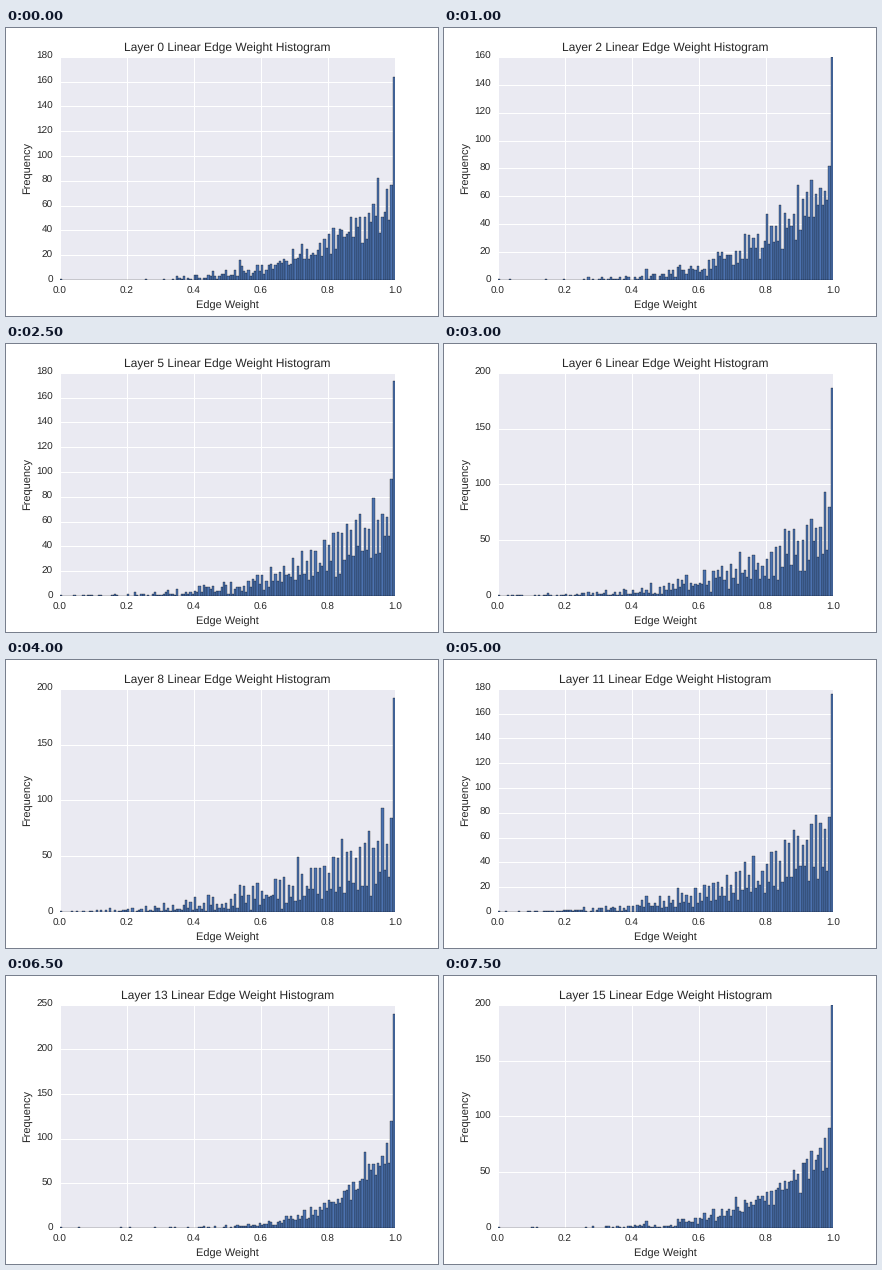
Write a matplotlib script that moves like this. It is 432x288 px and loops after 8 s.

```python
import numpy as np
import matplotlib.pyplot as plt
from matplotlib.animation import FuncAnimation

plt.rcParams.update({
    "font.family": "Liberation Sans",
    "text.hinting": "none",
    "text.color": "0.15",
    "axes.labelcolor": "0.15",
    "xtick.color": "0.15",
    "ytick.color": "0.15",
    "ytick.alignment": "center",
    "axes.facecolor": "#EAEAF2",
    "axes.axisbelow": True,
})

BINS = 150
LAYERS = [0, 1, 2, 3, 4, 5, 6, 7, 8, 9, 11, 10, 12, 13, 14, 15]
# Height of the rightmost bar, which also sets the y range
PEAKS = [164, 170, 160, 190, 168, 173, 186, 188,
         192, 174, 176, 190, 195, 240, 225, 200]


def counts(i):
    """Noisy power-law histogram; flatter curves zigzag more."""
    rng = np.random.default_rng(40 + i)
    k = np.arange(BINS)
    x = (k + 0.5) / BINS
    p = np.interp(i, [0, 2, 8, 10, 13, 15], [4, 4, 3, 3.2, 6, 4.6])
    mean = 14 * (p + 1) * x ** p + 8 * max(0, 4 - p) * x * (1 - x) + 0.05
    swing = max(0.08, 0.38 - 0.2 * (p - 3))
    h = rng.poisson(mean * (1 + swing * (-1.0) ** k))
    h[0], h[-1] = 1, PEAKS[i]
    return h


def y_ticks(peak):
    step = 20 if peak <= 180 else 50
    top = -(-peak // step) * step
    return np.arange(0, top + 1, step)


fig = plt.figure(figsize=(6, 4), dpi=72, facecolor="white")
ax = fig.add_axes([0.125, 0.125, 0.775, 0.775])
for spine in ax.spines.values():
    spine.set_visible(False)
ax.grid(True, color="white", linewidth=1, linestyle="-")
ax.tick_params(length=0, pad=7, labelsize=10)
ax.set_xlim(0, 1)
ax.set_xticks(np.linspace(0, 1, 6))
ax.set_xlabel("Edge Weight", fontsize=11, labelpad=4)
ax.set_ylabel("Frequency", fontsize=11, labelpad=4)
title = ax.set_title("", fontsize=12, pad=5)
bars = ax.bar(np.arange(BINS) / BINS, np.zeros(BINS), 1 / BINS, align="edge",
              color="#4C72B0", edgecolor="black", linewidth=0.3)


def draw(i):
    ticks = y_ticks(PEAKS[i])
    ax.set_ylim(0, ticks[-1])
    ax.set_yticks(ticks)
    title.set_text(f"Layer {LAYERS[i]} Linear Edge Weight Histogram")
    for bar, h in zip(bars, counts(i)):
        bar.set_height(h)
    return [title, *bars]


anim = FuncAnimation(fig, draw, frames=len(LAYERS), interval=500,
                     init_func=lambda: draw(0), repeat=True, repeat_delay=0)
plt.show()
```
